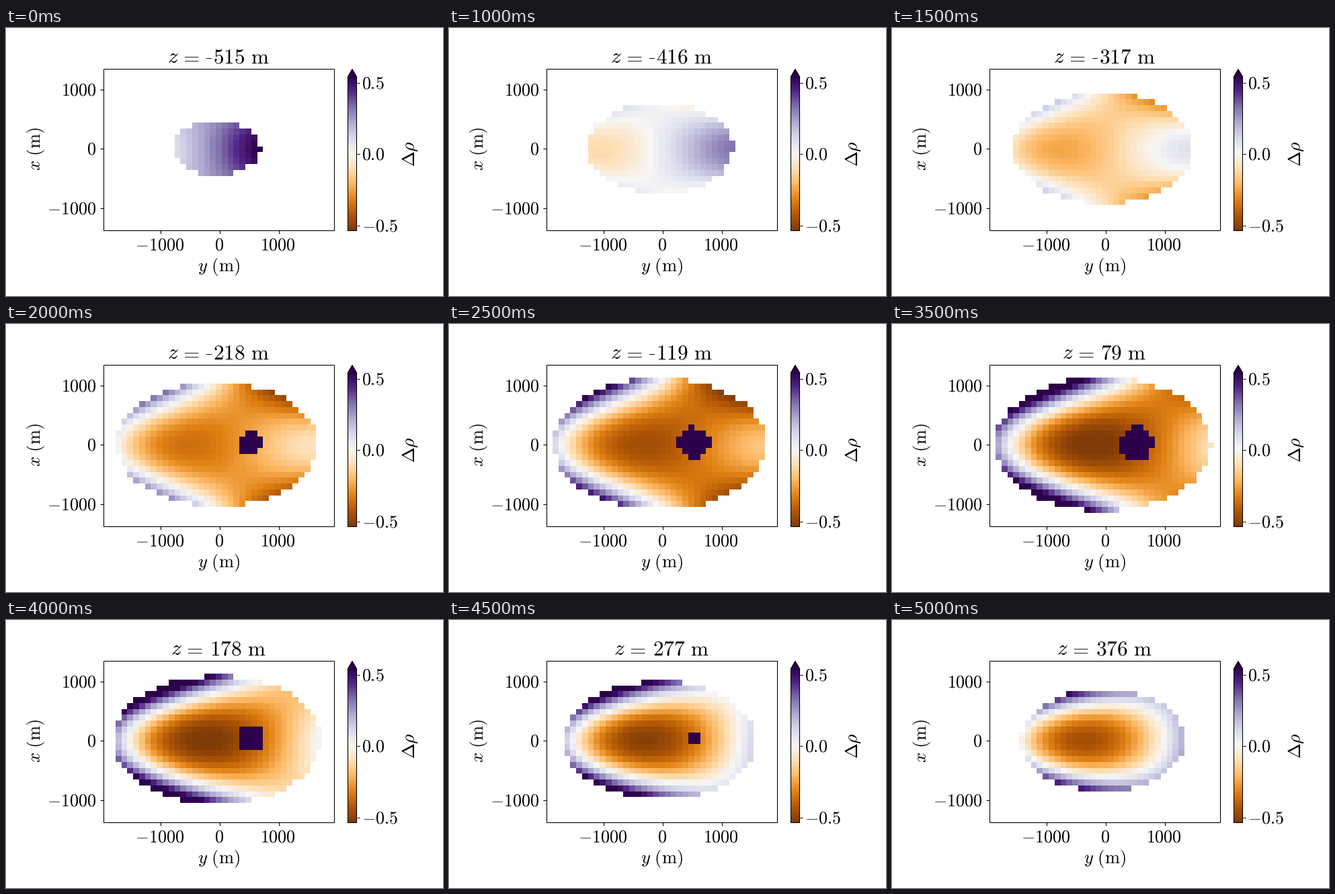
Recreate the animation shown at these times as a matplotlib script. Size 650x400 px, loop 5.5 s.

```python
import matplotlib.pyplot as plt
import numpy as np
from matplotlib.animation import FuncAnimation
from matplotlib.patches import Polygon, Rectangle

plt.rcParams["mathtext.fontset"] = "cm"

WIDTH, HEIGHT, DPI = 650, 400, 100
COLS, ROWS, CELL = 37, 23, 8.757
LEFT, TOP = 154.0, 81.0
LIMIT = 0.54
CMAP = plt.get_cmap("PuOr")
TITLE_EM = 31.4

# All lengths below are in cells; z counts slices from the lowest one
BODY_CENTRE, BODY_AXES = (18.2, 11.3, 5.25), (18.47, 11.47, 5.728)
CORE_CENTRE, CORE_RADIUS = (23.9, 11.15, 5.2), 2.96


def density(p, q, s):
    """Cubic field over body coordinates p (right), q (down), s (up)."""
    axis = -.535 - .22 * s + .65 * s**2 - .13 * s**3
    along = (.13 - .04 * s + .57 * s**2) * p + .58 * (1 + s) * p**2 - .33 * p**3
    across = (.78 + 1.15 * s - 1.6 * p) * q**2 + .07 * p * q
    return axis + along + across


def slice_colors(k):
    """RGBA cells of one horizontal slice, transparent outside the body."""
    col, row = np.meshgrid(np.arange(COLS) + .5, np.arange(ROWS) + .5)
    cell = (col, row, k)
    p, q, s = ((v - c) / a for v, c, a in zip(cell, BODY_CENTRE, BODY_AXES))
    value = density(p, q, s)
    core = sum((v - c)**2 for v, c in zip(cell, CORE_CENTRE)) < CORE_RADIUS**2
    value[core] = LIMIT
    rgba = CMAP(np.clip(value / (2 * LIMIT) + .5, 0, 1))
    rgba[..., 3] = p**2 + q**2 + s**2 < 1
    return rgba


fig = plt.figure(figsize=(WIDTH / DPI, HEIGHT / DPI), dpi=DPI, facecolor="white")
ax = fig.add_axes([0, 0, 1, 1])
ax.axis("off")


def label(x, y, text, px=26, ha="center", **kw):
    return ax.text(x, y, text, fontsize=px * 72 / DPI, ha=ha, va="baseline", **kw)


def line(x0, y0, x1, y1):
    ax.plot([x0, x1], [y0, y1], color="black", lw=.8, solid_capstyle="butt")


body = ax.imshow(slice_colors(0), interpolation="nearest", aspect="auto",
                 extent=(LEFT, LEFT + COLS * CELL, TOP + ROWS * CELL, TOP))
ax.add_patch(Rectangle((145, 61), 343, 241, fill=False, ec="black", lw=.8))

for i in (-1, 0, 1):
    text = f"${1000 * i}$"
    x, y = 318 + 88.4 * i, 180.4 - 88.4 * i
    line(x, 302, x, 307)
    label(x - 1.5, 331, text)
    line(140, y, 145, y)
    label(134.5, y + 8.4, text, ha="right")
label(316, 363, r"$y\ \mathrm{(m)}$", px=26.5)
label(51, 181, r"$x\ \mathrm{(m)}$", px=26.5, rotation=90, rotation_mode="anchor")

# Colour bar with an arrow at its upper end
ax.imshow(CMAP(np.linspace(1, 0, 256))[:, None], aspect="auto",
          interpolation="nearest", extent=(508.5, 521.5, 302.5, 72.5))
ax.add_patch(Polygon([(508.5, 72.5), (515, 61.5), (521.5, 72.5)],
                     fc=CMAP(1.0), ec="none"))
ax.add_patch(Polygon([(508.5, 302.5), (508.5, 72.5), (515, 61.5),
                      (521.5, 72.5), (521.5, 302.5)],
                     fill=False, ec="black", lw=.8))
for value in (-.5, 0, .5):
    y = 188 - 213 * value
    line(521.5, y, 526, y)
    label(528.7, y + 8.6, f"${value:.1f}$", ha="left")
label(608, 188, r"$\Delta\rho$", px=27.5, rotation=90, rotation_mode="anchor")

title_z = label(0, 52.4, "$z$", TITLE_EM, "left")
title_eq = label(0, 52.4, "$=$", TITLE_EM)
title_num = label(0, 52.4, "", TITLE_EM, "left")
hyphen = ax.add_patch(Rectangle((0, 44.6), .265 * TITLE_EM, 1.8, fc="black", ec="none"))

ax.set_xlim(0, WIDTH)
ax.set_ylim(HEIGHT, 0)


def set_title(z):
    digits = str(abs(z))
    sign = .333 if z < 0 else 0
    total = 1.84 + sign + .5 * len(digits) + 1.166
    start = 315.5 - total * TITLE_EM / 2
    title_z.set_x(start)
    title_eq.set_x(start + 1.07 * TITLE_EM)
    title_num.set_x(start + (1.84 + sign) * TITLE_EM)
    title_num.set_text(rf"$\mathrm{{{digits}\ m}}$")
    hyphen.set_x(start + 1.85 * TITLE_EM)
    hyphen.set_visible(z < 0)


def update(step):
    k = max(0, step - 1)  # the first slice is held twice as long
    body.set_data(slice_colors(k))
    set_title(-515 + 99 * k)
    return body, title_z, title_eq, title_num, hyphen


anim = FuncAnimation(fig, update, frames=11, interval=500, repeat=True, repeat_delay=0)
plt.show()
```
